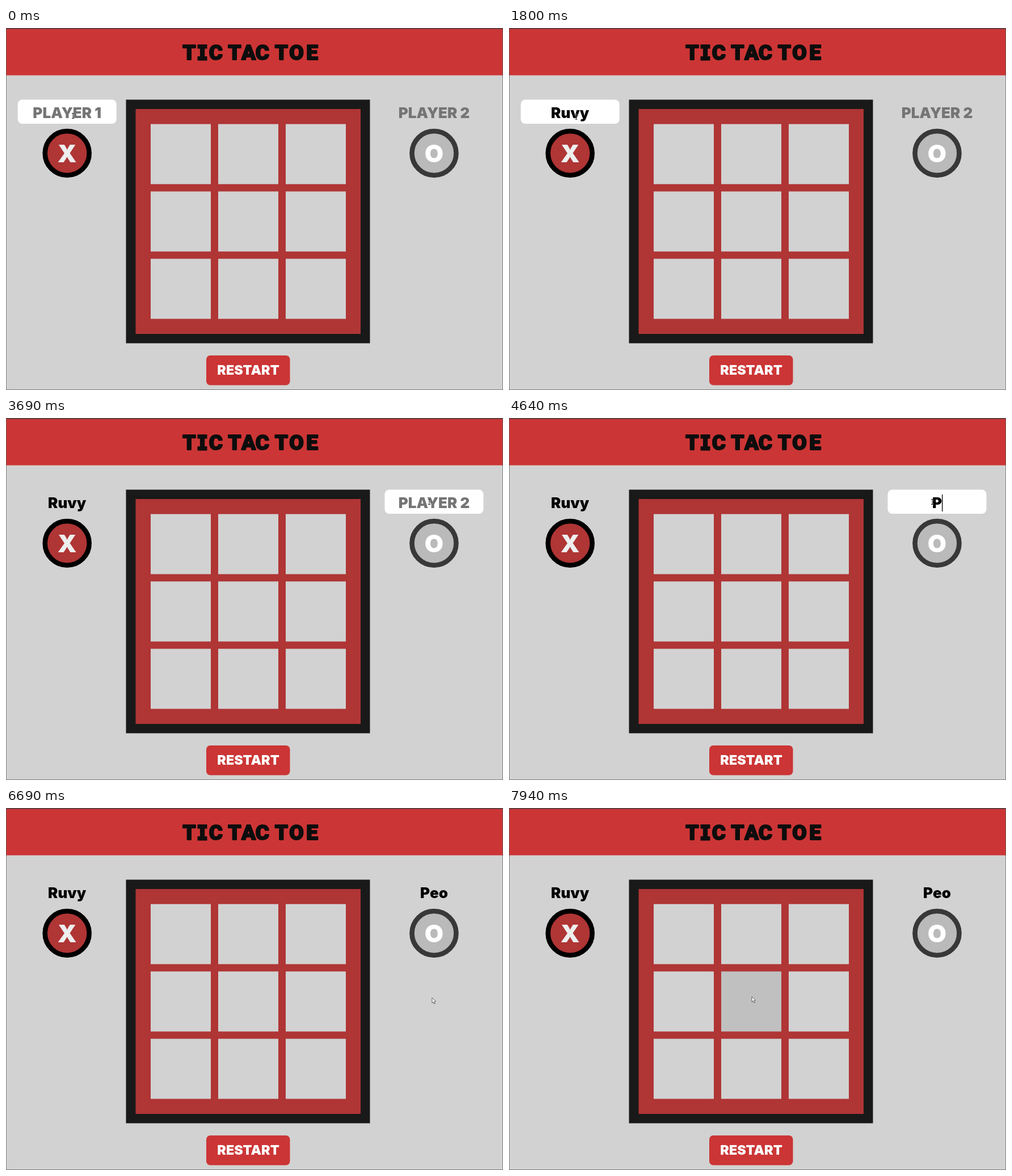
Recreate the animation shown at these times as an HTML page with a canvas. Size 876 by 639 pixels, loop 8000 ms.

```html
<!DOCTYPE html>
<html lang="en">
<head>
<meta charset="utf-8">
<title>Tic Tac Toe</title>
<style>
  html, body { margin: 0; width: 100%; height: 100%; overflow: hidden; background: #d2d2d2; }
  canvas { display: block; }
</style>
</head>
<body>
<canvas id="stage" width="876" height="639"></canvas>
<script>
const ctx = document.getElementById('stage').getContext('2d');
const LOOP = 8000;
const UI_FONT = 'Inter, "Open Sans", sans-serif';
const RED = '#cc3535', BRICK = '#b03535', GREY = '#d2d2d2';

const players = [
  { x: 107.7, hint: 'PLAYER 1', name: 'Ruvy', mark: 'X', markColor: '#eeeeee',
    ring: '#000000', fill: BRICK, focus: [0, 2320],
    keys: [500, 820, 940, 1060], caret: [[500, 1610], [2130, 2320]] },
  { x: 754.5, hint: 'PLAYER 2', name: 'Peo', mark: 'O', markColor: '#ffffff',
    ring: '#383838', fill: '#bababa', focus: [3170, 6680],
    keys: [4640, 4940, 5020], caret: [[3170, 3690], [4150, 5540], [6020, 6680]] }
];

// Mouse stops: time, x, y
const mousePath = [
  [0, 118, 155], [1770, 118, 155], [2290, 165, 315], [2480, 162, 317],
  [2630, 615, 124], [2820, 690, 113], [3120, 746, 148], [5970, 746, 148],
  [6600, 751, 335], [6790, 751, 335], [6950, 747, 331],
  [7270, 747, 331], [7940, 428, 333]
];

const within = (t, [from, to]) => t >= from && t < to;
const smooth = u => u * u * (3 - 2 * u);

function mouseAt(t) {
  const i = mousePath.findIndex(stop => stop[0] > t);
  if (i < 0) return mousePath[mousePath.length - 1].slice(1);
  const [t0, x0, y0] = mousePath[i - 1];
  const [t1, x1, y1] = mousePath[i];
  const u = smooth((t - t0) / (t1 - t0));
  return [x0 + (x1 - x0) * u, y0 + (y1 - y0) * u];
}

function rect(x, y, w, h, color) {
  ctx.fillStyle = color;
  ctx.fillRect(x, y, w, h);
}

function roundRect(x, y, w, h, r, color) {
  ctx.fillStyle = color;
  ctx.beginPath();
  ctx.roundRect(x, y, w, h, r);
  ctx.fill();
}

function label(text, x, y, size, color) {
  ctx.font = `900 ${size}px ${UI_FONT}`;
  ctx.fillStyle = color;
  ctx.fillText(text, x, y);
}

function drawTitle() {
  const centers = [323, 346, 370, 0, 403, 427.5, 452, 0, 485.5, 512, 539.5];
  ctx.font = '900 37px Roboto, sans-serif';
  ctx.fillStyle = ctx.strokeStyle = '#0d0d0d';
  ctx.lineWidth = 2;
  ctx.lineJoin = 'bevel';
  [...'TIC TAC TOE'].forEach((letter, i) => {
    ctx.fillText(letter, centers[i], 56.2);
    ctx.strokeText(letter, centers[i], 56.2);
  });
  // Slab ends of the I
  rect(337.5, 29, 17, 7.5, '#0d0d0d');
  rect(337.5, 50, 17, 7.5, '#0d0d0d');
}

function drawBoard(mx, my) {
  rect(211.5, 126.5, 430, 430, '#191919');
  rect(228.5, 143, 396.5, 397, BRICK);
  for (let row = 0; row < 3; row++) {
    for (let col = 0; col < 3; col++) {
      const x = 255 + col * 119, y = 169.6 + row * 118.9;
      const hover = mx >= x && mx < x + 106 && my >= y && my < y + 106;
      rect(x, y, 106, 106, hover ? '#c0c0c0' : GREY);
    }
  }
}

function drawPlayer(p, t) {
  if (within(t, p.focus)) roundRect(p.x - 87, 126.5, 174, 42.5, 8, '#ffffff');
  const typed = p.name.slice(0, p.keys.filter(k => k <= t).length);
  label(typed || p.hint, p.x, 159.3, 26, typed ? '#000000' : '#757575');
  if (p.caret.some(span => within(t, span))) {
    rect(p.x + ctx.measureText(typed).width / 2, 135, 1.3, 30, '#000000');
  }
  ctx.beginPath();
  ctx.arc(p.x, 221, 39, 0, Math.PI * 2);
  ctx.fillStyle = p.fill;
  ctx.fill();
  ctx.lineWidth = 8.6;
  ctx.strokeStyle = p.ring;
  ctx.stroke();
  label(p.mark, p.x, 236.5, 43, p.markColor);
}

function drawArrow(x, y) {
  const shape = [[0, 0], [0, 9.2], [2.2, 7.3], [3.7, 10.8], [5.3, 10.1], [3.9, 6.8], [6.6, 6.5]];
  ctx.beginPath();
  shape.forEach(([dx, dy]) => ctx.lineTo(x + dx, y + dy));
  ctx.closePath();
  ctx.fillStyle = '#ffffff';
  ctx.fill();
  ctx.lineWidth = 0.8;
  ctx.lineJoin = 'miter';
  ctx.strokeStyle = '#3c3c3c';
  ctx.stroke();
}

function drawBeam(x, y) {
  ctx.beginPath();
  for (const end of [-4.5, 4.5]) {
    ctx.moveTo(x - 2, y + end);
    ctx.lineTo(x + 2, y + end);
  }
  ctx.moveTo(x, y - 4.5);
  ctx.lineTo(x, y + 4.5);
  for (const [width, color] of [[2.2, 'rgba(255,255,255,.45)'], [1, '#222222']]) {
    ctx.lineWidth = width;
    ctx.strokeStyle = color;
    ctx.stroke();
  }
}

function draw(t) {
  const [mx, my] = mouseAt(t);
  ctx.textAlign = 'center';
  ctx.textBaseline = 'alphabetic';
  rect(0, 0, 876, 639, GREY);
  rect(0, 0, 876, 83.5, RED);
  rect(0, 0, 876, 1.6, '#4a4145');
  drawTitle();
  drawBoard(mx, my);
  players.forEach(p => drawPlayer(p, t));
  roundRect(353, 578, 147.5, 52.5, 7, RED);
  label('RESTART', 427, 612.3, 23.4, '#ffffff');
  for (const [x, y, w, h] of [[0, 2, 1, 637], [875, 2, 1, 637], [0, 638, 876, 1]]) {
    rect(x, y, w, h, 'rgba(90,90,90,.7)');
  }
  const overInput = my >= 126 && my < 169 && players.some(p => Math.abs(mx - p.x) < 87);
  (overInput ? drawBeam : drawArrow)(mx, my);
}

function tick() {
  draw(performance.now() % LOOP);
  requestAnimationFrame(tick);
}
tick();
</script>
</body>
</html>
```
